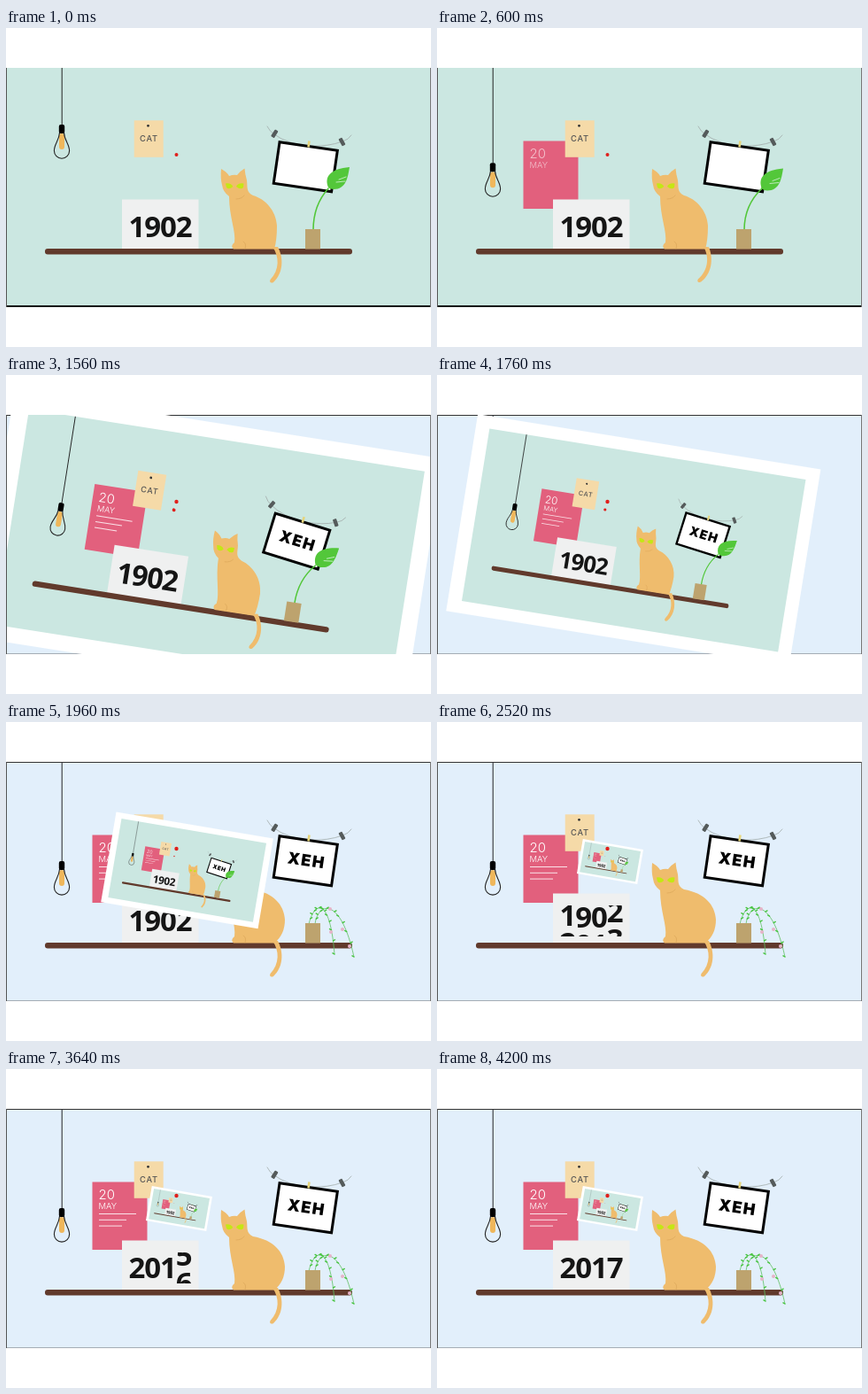
Animation of 480x360 px, one loop 5.48 s. Source, as an HTML page with a canvas:

```html
<!DOCTYPE html>
<html lang="en">
<head>
<meta charset="utf-8">
<title>Cat on a shelf</title>
<style>
  html, body { margin: 0; width: 100%; height: 100%; overflow: hidden; background: #fff; }
  canvas { display: block; width: 480px; height: 360px; }
</style>
</head>
<body>
<canvas id="stage" width="480" height="360"></canvas>
<script>
const ctx = document.getElementById('stage').getContext('2d');
const LOOP = 5480;
const SHOT = 1360;          // the room turns into a photo
const ROLL = 2400;          // the year starts rolling
const CAT = '#efbc6d', GREEN = '#53c73a', RED = '#e0201c';

const progress = (t, from, to) => Math.min(1, Math.max(0, (t - from) / (to - from)));
const mix = (a, b, p) => a + (b - a) * p;
const easeOut = p => 1 - (1 - p) ** 2;
const easeInOut = p => p < .5 ? 4 * p ** 3 : 1 - (2 - 2 * p) ** 3 / 2;
const radians = deg => deg * Math.PI / 180;

function box(x, y, w, h, color) {
  ctx.fillStyle = color;
  ctx.fillRect(x, y, w, h);
}

function dot(x, y, r, color) {
  ctx.fillStyle = color;
  ctx.beginPath();
  ctx.arc(x, y, r, 0, 2 * Math.PI);
  ctx.fill();
}

function pill(x, y, w, h, r, color) {
  ctx.fillStyle = color;
  ctx.beginPath();
  ctx.roundRect(x, y, w, h, r);
  ctx.fill();
}

function shape(d, color) {
  ctx.fillStyle = color;
  ctx.fill(new Path2D(d));
}

function line(d, color, width = 1) {
  ctx.strokeStyle = color;
  ctx.lineWidth = width;
  ctx.lineCap = 'round';
  ctx.stroke(new Path2D(d));
}

function write(text, x, y, font, color, align = 'left', spacing = 0) {
  ctx.font = font;
  ctx.fillStyle = color;
  ctx.textAlign = align;
  ctx.letterSpacing = spacing + 'px';
  ctx.fillText(text, x, y);
}

function turned(x, y, deg, draw) {
  ctx.save();
  ctx.translate(x, y);
  ctx.rotate(radians(deg));
  draw();
  ctx.restore();
}

function faded(alpha, draw) {
  ctx.save();
  ctx.globalAlpha *= alpha;
  draw();
  ctx.restore();
}

function bulb(top) {
  line(`M63.2 40V${top}`, '#222');
  ctx.save();
  ctx.translate(63, top);
  pill(-3, 10, 6, 18, 3, '#efb75b');
  line('M-2.5 9C-3 18 -8.6 22 -8.6 29.5A8.6 8.6 0 0 0 8.6 29.5C8.6 22 3 18 2.5 9', '#222', 1.1);
  pill(-3.2, 0, 6.4, 10, 2, '#000');
  ctx.restore();
}

function poster({ poster, heading, notes }) {
  faded(poster, () => box(97.5, 127.5, 62, 76.5, '#e2607d'));
  faded(heading, () => {
    write('20', 104.5, 147, '300 15px Inter, sans-serif', '#fff');
    write('MAY', 104.5, 158, '300 9.5px Inter, sans-serif', '#fff');
  });
  if (notes > 0) {
    [42, 31, 26].forEach((w, i) => box(105, 163 + i * 6.8, w * notes, 1, '#fbe3e9'));
  }
}

function note() {
  box(144.7, 104.3, 33, 41.5, '#f5daa8');
  dot(160.5, 110.3, 1.4, '#333');
  write('CAT', 151, 128.3, '500 9.3px Inter, sans-serif', '#555', 'left', .8);
}

// Each wheel holds its digits and its current position, counted in digits.
function yearCard(wheels) {
  box(131, 193.5, 86.5, 56, '#eff0f0');
  ctx.save();
  ctx.beginPath();
  ctx.rect(131, 207, 86, 35);
  ctx.clip();
  wheels.forEach(({ digits, at }, i) => {
    [...digits].forEach((digit, k) => {
      const x = 148 + i * 17.7, y = 236 + (k - at) * 31;
      write(digit, x, y, '900 33px "Noto Sans", "Open Sans", sans-serif', '#151515', 'center');
    });
  });
  ctx.restore();
}

function picture(title) {
  line('M295 111Q298 117 303 120Q318 131 342 133Q364 134 380 128Q387 126 390 121', '#a3adab', .8);
  turned(338.3, 156.7, 8.3, () => {
    box(-34.5, -25, 69, 50, '#000');
    box(-31.5, -22, 63, 44, '#fff');
    faded(title, () => write('XEH', 1, 5.5, '900 18px Inter, sans-serif', '#000', 'center', 1.5));
  });
  turned(303.3, 119.3, 32, () => pill(-2.2, -4.5, 4.4, 9, 1, '#555b5b'));
  turned(379.5, 128.5, -28, () => pill(-2.2, -4.5, 4.4, 9, 1, '#555b5b'));
  turned(342, 131, 8, () => box(-1.3, -3.5, 2.6, 7, '#e6d57c'));
}

function cat(back, sway) {
  turned(304, 247, sway, () =>
    shape('M-3 0C5 11 5 26 -5.5 37C-7 40 -4.5 41.5 -2 40C9 30 10 13 3 0Z', CAT));
  const b = 306 + back;
  shape(`M243 159Q249 162 252 167Q257 165 261 166Q265 161 269.5 158.5Q270 165 272 172
    C273 180 271 185 279 189C${b - 13} 193 ${b - 1} 206 ${b} 223Q${b} 240 303 249.5
    L257 249.5Q253 246 258 242C260 230 252 213 252 190Q245 185 244 177Q242 170 243 159Z`, CAT);
  line('M268 241Q272 243 270 249M260 193Q266 193 269 189', '#dca75a', .7);
  shape('M248 175.5Q254 174.5 256.3 179Q252 183 249 180ZM268.5 175.5Q262 174.5 260 179Q265 183 268 180Z', '#c4e714');
}

function leafPlant(sway) {
  line(`M347 228Q347 200 ${364 + sway} 181`, GREEN, 1.6);
  ctx.save();
  ctx.translate(sway, sway * .5);
  shape('M364 180C359 167 367 159 388 157C386 169 384 182 370 182Q366 182 364 180Z', GREEN);
  line('M373 174L383 173M376 171L384 168', '#d8f3dc', .8);
  ctx.restore();
}

function vine([x0, y0], [x1, y1], [x2, y2], [x3, y3]) {
  line(`M${x0} ${y0}C${x1} ${y1} ${x2} ${y2} ${x3} ${y3}`, '#5fbf63', .8);
  const at = (a, b, c, d, p) =>
    a * (1 - p) ** 3 + 3 * b * p * (1 - p) ** 2 + 3 * c * p * p * (1 - p) + d * p ** 3;
  for (let i = 1; i <= 12; i++) {
    const p = i / 12, side = i % 2 ? 1 : -1;
    const x = at(x0, x1, x2, x3, p), y = at(y0, y1, y2, y3, p);
    line(`M${x} ${y}l${side * 2} -1.2`, '#45c43c', 1.4);
  }
}

function vinePlant() {
  vine([349, 228], [352, 203], [378, 196], [393, 265]);
  vine([342, 228], [348, 202], [366, 196], [371, 262]);
  [[366, 211], [380, 234], [367, 237], [388, 253]].forEach(([x, y]) => dot(x, y, 2, '#e6b3c8'));
}

function room(state) {
  box(-20, 30, 520, 300, state.wall);
  bulb(state.bulbTop);
  poster(state);
  note();
  yearCard(state.wheels);
  picture(state.title);
  pill(44, 249, 347, 6.5, 3, '#613a2c');
  state.plant();
  box(338, 227, 17, 22.5, '#bda36e');
  cat(state.back, state.tail);
}

function mintRoom(t) {
  room({
    wall: '#cbe7e1',
    bulbTop: mix(109, 155, easeOut(progress(t, 0, 800))),
    poster: progress(t, 80, 560),
    heading: progress(t, 360, 760),
    notes: easeOut(progress(t, 680, 1240)),
    title: progress(t, 760, 1200),
    wheels: [...'1902'].map(digits => ({ digits, at: 0 })),
    plant: () => leafPlant(3 * Math.sin(Math.PI * t / 1280)),
    back: 0,
    tail: 7 * Math.sin(2 * Math.PI * t / 1700),
  });
  dot(192.5, 143, 2, RED);
}

function blueRoom(t) {
  const wheel = (digits, end) => ({ digits, at: progress(t, ROLL, end) * (digits.length - 1) });
  room({
    wall: '#e2effb',
    bulbTop: 157,
    poster: 1, heading: 1, notes: 1, title: 1,
    wheels: [wheel('12', 3040), wheel('90', 3300), wheel('01', 3440), wheel('234567', 4200)],
    plant: vinePlant,
    back: 9,
    tail: 0,
  });
}

function photo(t) {
  const tilt = easeOut(progress(t, SHOT, SHOT + 200));
  const shrink = easeInOut(progress(t, SHOT, SHOT + 1000));
  const x = mix(240 - 9 * tilt, 195.5, shrink);
  const y = mix(180 + 16.5 * tilt, 157.5, shrink);
  turned(x, y, 8.9 * tilt + shrink, () => {
    const size = mix(1.005, .138, shrink);
    ctx.scale(size, size);
    ctx.translate(-240, -180);
    box(-11, 36, 502, 288, '#fff');
    ctx.beginPath();
    ctx.rect(9, 54, 463, 252);
    ctx.clip();
    mintRoom(1280);
  });
}

function draw(t) {
  box(0, 0, 480, 360, '#fff');
  ctx.save();
  ctx.beginPath();
  ctx.rect(0, 45, 480, 270);
  ctx.clip();
  if (t < SHOT) {
    mintRoom(Math.min(t, 1280));
    box(0, 313, 480, 2, '#111');
  } else {
    blueRoom(t);
    box(0, 45, 480, 1, '#333');
    box(0, 314, 480, 1, '#a5adb5');
    photo(t);
    dot(192.5, 143, 2.2, RED);
  }
  box(0, 45, 1, 270, '#555');
  box(479, 45, 1, 270, '#777');
  ctx.restore();
}

function tick() {
  draw(performance.now() % LOOP);
  requestAnimationFrame(tick);
}
tick();
</script>
</body>
</html>
```
